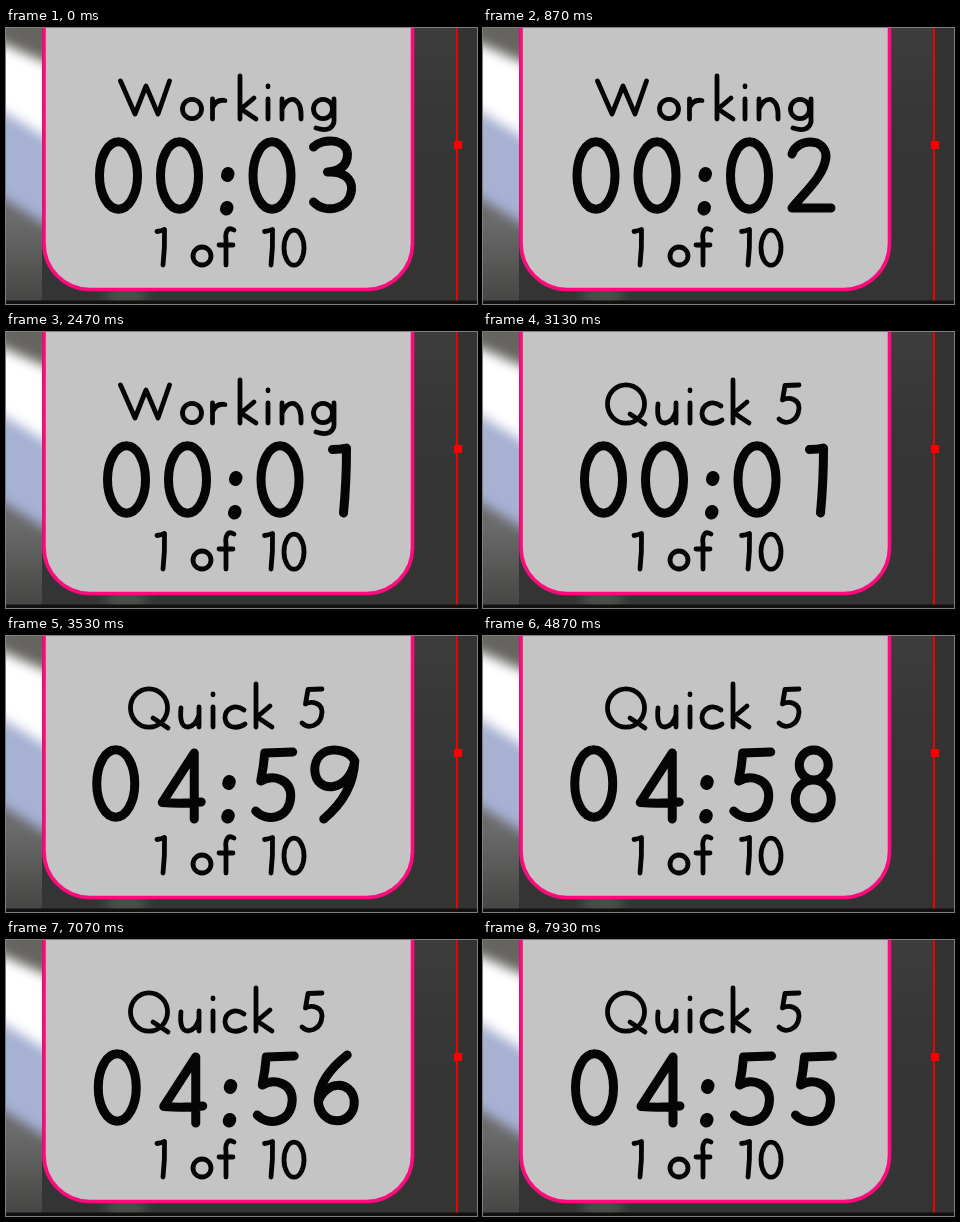
An HTML page that plays this animation: 471 px wide and 276 px high, repeating every 8000 ms.

```html
<!DOCTYPE html>
<html lang="en">
<head>
<meta charset="utf-8">
<title>Interval timer</title>
<style>
  html, body { margin: 0; width: 100%; height: 100%; overflow: hidden; background: #373737; }
  svg { display: block; width: 100%; height: 100%; }
  .ink { fill: none; stroke: #050505; stroke-linecap: round; stroke-linejoin: round; stroke-width: 4.8; }
  .big { stroke-width: 9; }
  .dots { stroke-width: 13; }
</style>
</head>
<body>
<svg viewBox="0 0 471 276" role="img" aria-label="Timer">
  <defs>
    <linearGradient id="wall" x2="0" y2="1">
      <stop offset="0" stop-color="#3d3d3d"/>
      <stop offset=".35" stop-color="#363636"/>
      <stop offset="1" stop-color="#343434"/>
    </linearGradient>
    <linearGradient id="blur" x2="0" y2="1">
      <stop offset="0" stop-color="#66645f"/>
      <stop offset=".7" stop-color="#6a6a6a"/>
      <stop offset="1" stop-color="#454543"/>
    </linearGradient>
    <filter id="soft" x="-1" y="-1" width="3" height="3"><feGaussianBlur stdDeviation="6"/></filter>
    <clipPath id="strip"><rect width="36" height="273"/></clipPath>
  </defs>
  <rect width="471" height="276" fill="url(#wall)"/>
  <rect x="452" width="19" height="276" fill="#333"/>
  <g clip-path="url(#strip)">
    <rect width="36" height="276" fill="url(#blur)"/>
    <g filter="url(#soft)">
      <path d="M-30 60L66 80V212L-30 154Z" fill="#a6b1d3"/>
      <path d="M-30 4L66 46V124L-30 66Z" fill="#fff"/>
    </g>
  </g>
  <ellipse cx="120" cy="268" rx="22" ry="8" fill="#52524e" filter="url(#soft)"/>
  <rect y="272.5" width="471" height="3.5" fill="#111"/>
  <rect x="38" y="-70" width="368.5" height="331.5" rx="46" fill="#c4c4c4" stroke="#ff0a7c" stroke-width="3.6"/>
  <path d="M451 0V272.5" stroke="#f00000" stroke-width="2"/>
  <rect x="448" y="113" width="8" height="8" fill="#ff0000"/>
  <path id="title" class="ink"/>
  <g id="clock" class="ink big"></g>
  <path id="round" class="ink"/>
</svg>
<script>
const oval = (x, y, rx, ry) =>
  `M${x} ${y - ry}a${rx} ${ry} 0 1 1 0 ${2 * ry}a${rx} ${ry} 0 1 1 0 ${-2 * ry}`;
const letterK = x => `M${x} 48V91M${x + 14} 70L${x + 1} 81 ${x + 16} 91`;
const letterI = x => `M${x} 71V91M${x} 58v.8`;

// Pen strokes for the two headings and the round counter
const titles = {
  'Working': 'M114.5 53L129 86 140 58 152 86 163.5 53' + oval(186, 81, 9.5, 9.7) +
    'M206.5 71V91M206.5 80Q210 71 219 72.5' + letterK(234) + letterI(262) +
    'M276 71V91M276 81Q281 70 288 71.5Q296 75 295 91' +
    oval(317, 81, 9.5, 9.7) + 'M328 71V94Q325 105 310 100',
  'Quick 5': oval(143, 72, 18.5, 19.2) + 'M147 82L162 92' +
    'M175 72Q173 91 182 91Q190 90 193 79M193 71V91' + letterI(207) +
    'M238 74C229 67 219 73 219 82C220 93 232 93 239 88' + letterK(250) +
    'M316 53L302 53.5 299.5 68C307 64 316 68 316 76C315 91 302 93 296 87'
};
const roundPath = 'M151 203.5Q155 203 158.5 201.5Q159 220 157 237' + oval(196, 228, 9, 9) +
  'M228 202C221 198 219 205 220 212L220 237M213 217H227' +
  'M258.5 203.5Q263 203 266.5 201.5Q267 220 265 237' + oval(288, 219.7, 10, 17.5);

// Clock characters: advance width and pen stroke
const glyphs = {
  0: [61, oval(30.5, 147.5, 19, 33.7)],
  1: [47, 'M22 117.5Q30 117.5 36 116Q36 150 33 181'],
  2: [62, 'M12 126C17 110 46 109 46 129C44 148 26 163 12 180H51'],
  3: [63, 'M11 119C20 110 44 110 45 126C45 138 37 143 25 144C40 143 50 150 49 162C47 182 22 186 11 174'],
  4: [65, 'M48 117L16 166.5Q36 168 55 166M48 117V183'],
  5: [61, 'M50 116L22 117Q21 130 18 145C30 138 48 143 48 160C47 184 23 186 13 175'],
  6: [61.5, 'M42 115Q14 137 13 160C14 188 50 187 49 161C47 140 20 140 13 162'],
  7: [65.5, 'M11 118Q32 118 53 116L14 181'],
  8: [62.5, oval(32, 129, 14.5, 15) + oval(31.5, 163, 18, 19)],
  9: [64.5, 'M51 125C43 109 11 109 11 134C12 159 46 156 51 125C50 148 38 168 20 183'],
  ':': [31.5, 'M18 145.5l-.5 2M17 179.5l-.5 1.5']
};

// start time, title, clock
const steps = [
  [0, 'Working', '00:03'],
  [490, 'Working', '00:02'],
  [1490, 'Working', '00:01'],
  [2490, 'Quick 5', '00:01'],
  [3490, 'Quick 5', '04:59'],
  [4490, 'Quick 5', '04:58'],
  [5490, 'Quick 5', '04:57'],
  [6490, 'Quick 5', '04:56'],
  [7490, 'Quick 5', '04:55']
];
const LOOP = 8000, CENTER = 220.75;
const $ = id => document.getElementById(id);
const svg = document.querySelector('svg');
let shown;

function clockMarkup(text) {
  const chars = [...text];
  let x = CENTER - chars.reduce((sum, c) => sum + glyphs[c][0], 0) / 2;
  return chars.map(c => {
    const [advance, d] = glyphs[c];
    const style = c === ':' ? ' class="dots"' : '';
    const mark = `<path transform="translate(${x})" d="${d}"${style}/>`;
    x += advance;
    return mark;
  }).join('');
}

function show(step) {
  const [, title, time] = step;
  $('title').setAttribute('d', titles[title]);
  $('clock').innerHTML = clockMarkup(time);
  svg.setAttribute('aria-label', `${title} ${time}, 1 of 10`);
  shown = step;
}

const start = performance.now();
function tick() {
  const t = (performance.now() - start) % LOOP;
  const step = steps.findLast(s => s[0] <= t);
  if (step !== shown) show(step);
  requestAnimationFrame(tick);
}
$('round').setAttribute('d', roundPath);
tick();
</script>
</body>
</html>
```
